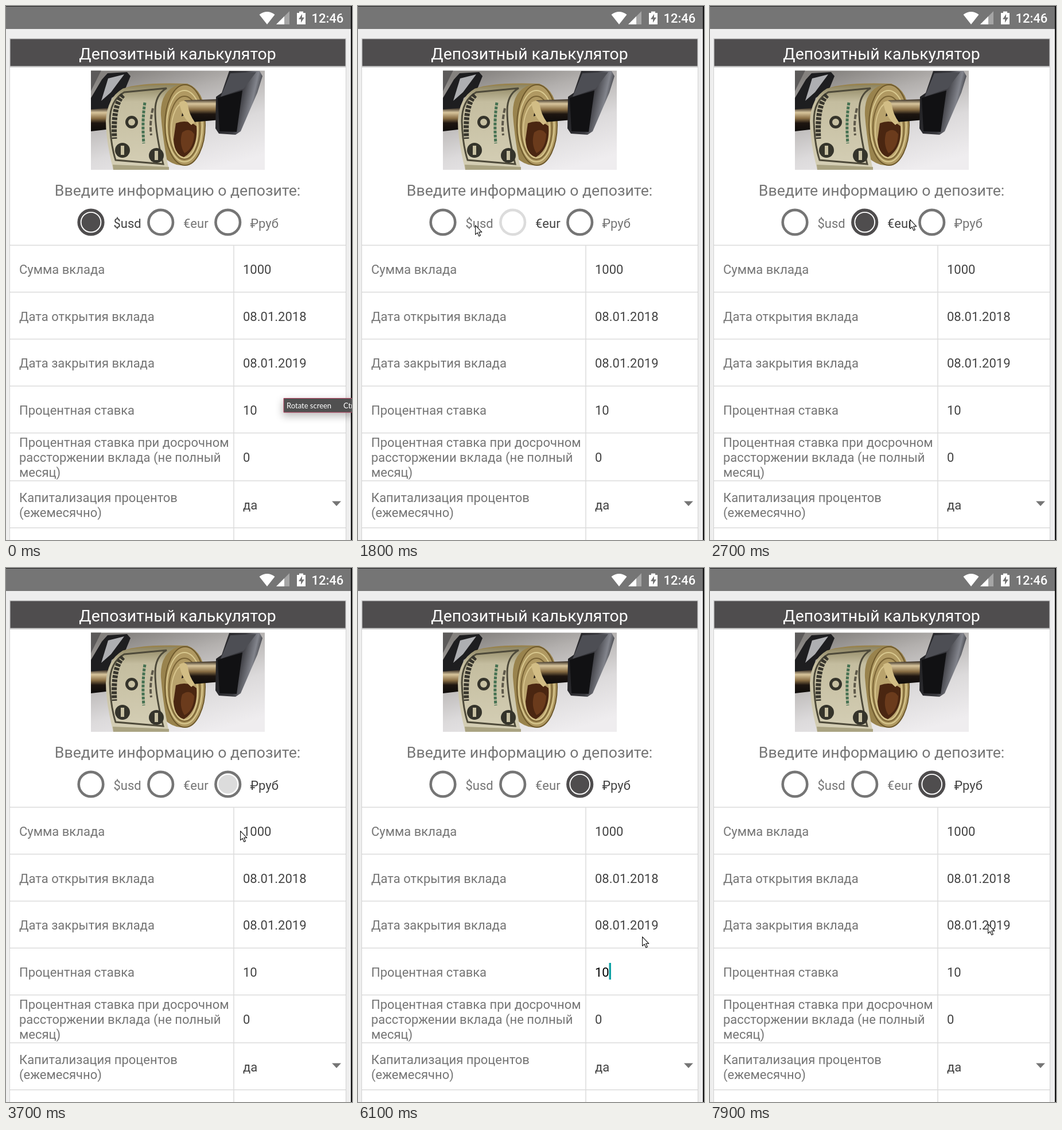
An HTML page that plays this animation: 603 by 929 pixels, repeating every 8000 ms.

```html
<!DOCTYPE html>
<html lang="ru">
<head>
<meta charset="utf-8">
<style>
  html, body { margin: 0; width: 100%; height: 100%; overflow: hidden; background: #eee; }
  svg { display: block; font: 22px Roboto, sans-serif; }
  .label { fill: #757575; }
  .value { fill: #434343; }
  .tip { font: 13px Lato, sans-serif; fill: #fff; }
</style>
</head>
<body>
<svg width="603" height="929" viewBox="0 0 603 929">
  <defs>
    <linearGradient id="wall" x1=".2" x2=".7" y2="1">
      <stop offset="0" stop-color="#84817e"/><stop offset=".3" stop-color="#b3b0ae"/>
      <stop offset=".65" stop-color="#dcdadb"/><stop offset="1" stop-color="#efedef"/>
    </linearGradient>
    <linearGradient id="bar" x2="0" y2="1">
      <stop offset="0" stop-color="#2a211a"/><stop offset=".2" stop-color="#d8c59d"/>
      <stop offset=".45" stop-color="#8a6f45"/><stop offset=".65" stop-color="#1d1510"/>
      <stop offset="1" stop-color="#0e0c0b"/>
    </linearGradient>
    <linearGradient id="chrome" x2="1" y2=".3">
      <stop offset="0" stop-color="#1a1a1c"/><stop offset=".6" stop-color="#3a3a3f"/>
      <stop offset=".85" stop-color="#83858d"/><stop offset="1" stop-color="#2a2a2e"/>
    </linearGradient>
    <linearGradient id="paper" x2="0" y2="1">
      <stop offset="0" stop-color="#8d8460"/><stop offset=".2" stop-color="#c4bd9f"/>
      <stop offset="1" stop-color="#d5cfb6"/>
    </linearGradient>
    <clipPath id="photo"><path d="M148 112.5H451V285H148Z"/></clipPath>
    <filter id="soft" x="-30%" y="-80%" width="160%" height="300%"><feGaussianBlur stdDeviation="7"/></filter>
  </defs>

  <path fill="#eee" d="M0 0H603V929H0Z"/>
  <path fill="#757575" d="M0 0H601V40H0Z"/>
  <path fill="#222" d="M0 0H603V1H0Z"/>
  <path fill="#111" d="M601 0H603V929H601Z"/>

  <g fill="#fff">
    <path d="M455 32 441.5 15Q455 5 468.5 15Z"/>
    <path opacity=".35" d="M494 9V32H471Z"/>
    <path d="M485 18V32H471Z"/>
    <path d="M507 12H511V9.5H518V12H522V32H507Z"/>
    <path fill="#757575" d="M516 14 510 23H514V29L520 20H516Z"/>
    <text x="532.5" y="29" font-weight="500">12:46</text>
  </g>

  <path fill="#d2d2d2" d="M6 56H593V929H6Z"/>
  <path fill="#fff" d="M7 107H592V929H7Z"/>
  <path fill="#4f4d4e" d="M7.5 57.5H591.5V104.5H7.5Z"/>
  <text x="299" y="93" font-size="28.4" text-anchor="middle" fill="#fff">Депозитный калькулятор</text>

  <g clip-path="url(#photo)">
    <path fill="url(#wall)" d="M148 112H451V285H148Z"/>
    <path fill="#5c5a5a" d="M148 112H166L148 148Z"/>
    <path fill="#1e1e20" d="M167 128 177 117 211 115 217 122 208 144 184 160 178 184 148 183V160Z"/>
    <path fill="#aeafb2" d="M178 126 206 119 183 150 166 165Z"/>
    <path fill="url(#bar)" d="M148 180 183 177V214L148 218Z"/>
    <path fill="#99834d" d="M203 144Q235 132 316 135Q350 148 347 205Q342 263 309 277Q292 279 274 262Z"/>
    <g fill="none" stroke-width="2">
      <ellipse cx="312" cy="207" rx="35" ry="70" fill="#b09962" stroke="#6f5a2d"/>
      <ellipse cx="311" cy="209" rx="31" ry="62" stroke="#d9c990"/>
      <ellipse cx="311" cy="212" rx="27" ry="55" stroke="#7a6435"/>
      <ellipse cx="311" cy="216" rx="23" ry="48" fill="#b8a26c" stroke="#d8c58d"/>
    </g>
    <path fill="#4a2611" d="M296 204Q316 196 332 209Q335 248 310 263Q293 258 292 232Z"/>
    <path fill="#6b3b1c" d="M307 220Q320 210 328 223Q327 248 311 256Q301 240 307 220Z"/>
    <path fill="url(#bar)" d="M311 164 373 162V198L326 202Q320 185 306 192Z"/>
    <path fill="#d2bd85" d="M302 168Q314 160 317 173Q319 188 329 202L323 207Q306 193 302 168Z"/>
    <path fill="url(#chrome)" d="M389 113H442L447 122 438 151 409 218 400 224 371 222 365 213 366 158 376 151Z"/>
    <path fill="#4d4e54" d="M391 117 436 115 414 144 374 158Z"/>
    <path fill="#111113" d="M369 160 412 147 402 219 372 218Z"/>
    <path fill="url(#paper)" d="M203 144Q230 137 300 137Q268 148 270 190Q274 240 284 285H187Q174 235 174 200Q176 160 203 144Z"/>
    <path fill="none" stroke="#4e4a3a" stroke-width="3" d="M206 150Q181 164 181 200Q182 240 191 268L274 275Q260 220 260 182Q260 154 280 143Z"/>
    <path fill="none" stroke="#38362d" stroke-width="9" stroke-dasharray="5 2" d="M204 155Q186 172 189 231"/>
    <path fill="none" stroke="#477253" stroke-width="5" stroke-dasharray="5 2" d="M242 168Q237 199 240 239"/>
    <path fill="none" stroke="#5e594a" stroke-width="4" stroke-dasharray="8 3" d="M256 178Q250 203 253 225"/>
    <g fill="#35342b">
      <circle cx="219" cy="202" r="11"/><circle cx="203" cy="251" r="13"/><circle cx="262" cy="260" r="13"/>
    </g>
    <g fill="#c8c1a3">
      <circle cx="219" cy="202" r="6"/><path d="M200 243H206V259H200ZM259 252H265V268H259Z"/>
    </g>
    <path fill="#aaa382" d="M186 276 284 280V285H187Z"/>
  </g>

  <text class="label" x="299" y="329.5" font-size="26.7" text-anchor="middle">Введите информацию о депозите:</text>
  <g id="radios"></g>
  <path stroke="#dcdcdc" stroke-width="1.5" d="M7 416.2H592M7 497.8H592M7 579.5H592M7 661.2H592M7 742.8H592M7 826H592M7 907.7H592M397 416V929"/>
  <g id="rows"></g>
  <path fill="#757575" d="M568 861.5H584L576 870Z"/>
  <path id="caret" fill="#12a3a6" d="M437.5 687H441V716H437.5Z"/>

  <g id="tooltip">
    <path fill="#000" opacity=".25" filter="url(#soft)" d="M482 686H610V714H482Z"/>
    <path fill="#505050" stroke="#b84563" d="M484 682.5H610V707H484Z"/>
    <text class="tip" x="489" y="699.5">Rotate screen</text>
    <text class="tip" x="588" y="699.5">Ctrl</text>
  </g>
  <path id="pointer" fill="#fff" stroke="#222" stroke-width="1.2" stroke-linejoin="round"
    d="M.6.6V16.6L4.2 13.4 6.9 19.4 9.4 18.3 6.8 12.4H11.8Z"/>
</svg>
<script>
const LOOP = 8000, STEP = 100;
const DARK = '#4f4d4e', GREY = '#757575', PALE = '#dcdcdc';
const $ = id => document.getElementById(id);
const show = (node, on) => node.setAttribute('visibility', on ? 'visible' : 'hidden');

// Each row: baseline, value, label lines
const rows = [
  [466, '1000', 'Сумма вклада'],
  [547.7, '08.01.2018', 'Дата открытия вклада'],
  [629.3, '08.01.2019', 'Дата закрытия вклада'],
  [711, '10', 'Процентная ставка'],
  [793, '0', 'Процентная ставка при досрочном', 'рассторжении вклада (не полный', 'месяц)'],
  [875.5, 'да', 'Капитализация процентов', '(ежемесячно)']
];
$('rows').innerHTML = rows.map(([y, value, ...lines]) =>
  lines.map((line, i) =>
    `<text class="label" x="23" y="${y + (i - (lines.length - 1) / 2) * 26}">${line}</text>`).join('') +
  `<text class="value" x="413" y="${y}">${value}</text>`).join('');
const rate = document.querySelectorAll('.value')[3];

// Press and release times of each currency; the first is selected from the start
const radios = [
  { x: 148, textX: 187.5, name: '$usd', press: -1000, release: -900 },
  { x: 269.7, textX: 309, name: '€eur', press: 1600, release: 1700 },
  { x: 386.7, textX: 425.5, name: '₽руб', press: 3300, release: 3500 }
];
$('radios').innerHTML = radios.map(r =>
  `<circle cx="${r.x}" cy="376.2" fill="#fff"/>
   <circle cx="${r.x}" cy="376.2" r="16.4"/>
   <text x="${r.textX}" y="386">${r.name}</text>`).join('');
radios.forEach((r, i) => {
  [r.ring, r.dot, r.text] = [...$('radios').children].slice(i * 3, i * 3 + 3);
});

// Pointer strokes: start time, then one position per step; the last one holds
const strokes = [
  [700, [580, 560], [472, 402], [372, 333], [303, 350], [281, 382]],
  [1300, [275, 382], [269, 383]],
  [1600, [267, 383], [238, 382], [204, 381], [183, 379], [171, 377], [165, 376], [162, 375], [160, 375], [159, 374]],
  [2500, [170, 370], [249, 361], [348, 371], [386, 372], [391, 371]],
  [3100, [392, 370]],
  [3500, [393, 376], [398, 408], [408, 457], [424, 532], [445, 612], [459, 670], [462, 697], [456, 703], [450, 703]],
  [4400, [450, 706]],
  [5900, [457, 699], [480, 669], [495, 641], [496, 625], [495, 619], [493, 617]],
  [7000, [492, 617]],
  [7900, [484, 619]]
];

function drawRadio(radio, next, t) {
  const checked = t >= radio.release && !(next && t >= next.release);
  const age = t - radio.release;
  const pressed = t >= radio.press && age < 200;
  const settled = checked && age >= 300;
  const width = settled ? 5.3 : 4.6;
  radio.ring.setAttribute('stroke', pressed ? PALE : settled ? DARK : GREY);
  radio.ring.setAttribute('stroke-width', width);
  radio.ring.setAttribute('r', 23.6 - width / 2);
  radio.dot.setAttribute('fill', age < 300 ? PALE : DARK);
  show(radio.dot, checked && age >= 200);
  radio.text.setAttribute('fill', checked ? '#434343' : GREY);
}

function draw(t) {
  radios.forEach((r, i) => drawRadio(r, radios[i + 1], t));
  show($('tooltip'), t < 700);

  const stroke = strokes.filter(s => s[0] <= t).pop();
  show($('pointer'), stroke);
  if (stroke) {
    const [start, ...points] = stroke;
    const at = points[Math.min((t - start) / STEP, points.length - 1)];
    $('pointer').setAttribute('transform', `translate(${at})`);
  }

  show($('caret'), t >= 4700 && t < 7100 && (t < 4900 || (t - 4900) % 1000 >= 500 === false ? t < 4900 : true));
  rate.style.fill = t >= 4900 && t < 7100 ? '#000' : '';
}

// The caret appears at 4700, hides at 5400 and then blinks every half second
function caretOn(t) {
  return t >= 4700 && t < 7100 && (t < 5400 || Math.floor((t - 5400) / 500) % 2 === 1);
}

function tick() {
  const t = Math.floor(performance.now() % LOOP / STEP) * STEP;
  draw(t);
  show($('caret'), caretOn(t));
  requestAnimationFrame(tick);
}
tick();
</script>
</body>
</html>
```
